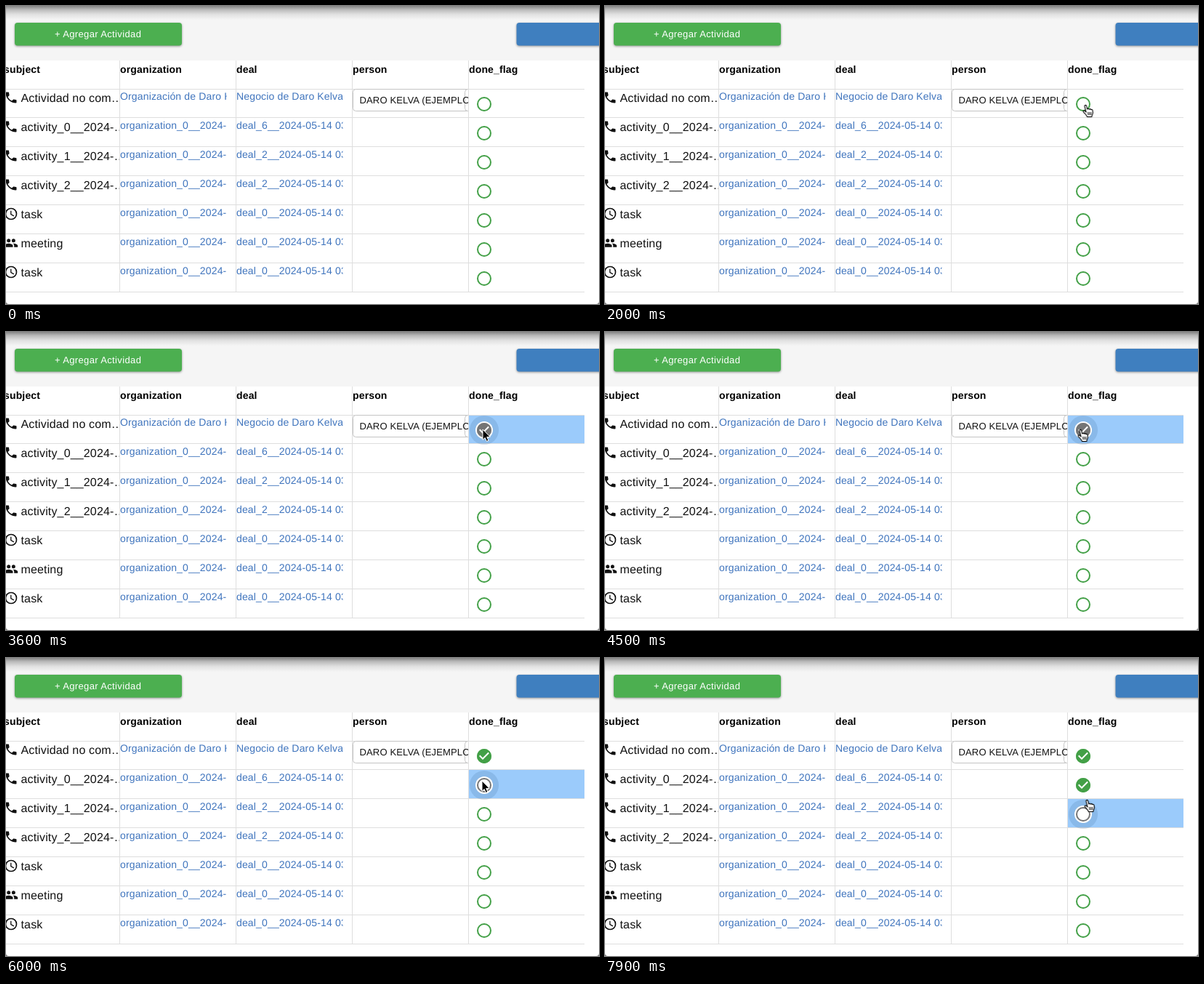
An HTML page for the animation above (8 s loop, 816 by 410 pixels).

```html
<!DOCTYPE html>
<html lang="es">
<head>
<meta charset="utf-8">
<title>Actividades</title>
<style>
  html, body { margin: 0; width: 100%; height: 100%; overflow: hidden; background: #777; }
  #stage { display: block; width: 816px; height: 410px; background: #fff; border-radius: 0 0 4px 4px; }
  text { font: 14px "Liberation Sans", Arial, sans-serif; letter-spacing: .15px; fill: #111; text-rendering: geometricPrecision; white-space: pre; }
  .head { font-weight: bold; fill: #000; }
  .subject { font-size: 16px; }
  .link { fill: #3f74bd; }
  .chip { font-size: 13px; }
  .label { font-size: 13px; letter-spacing: .36px; fill: #fff; }
  .button { filter: drop-shadow(0 1px 1.5px rgba(0, 0, 0, .4)); }
  .line { fill: #dedede; }
  .box { fill: #fff; stroke: #c4c4c4; }

  /* Each row carries two switches: --on (focused) and --done (checked). */
  .row { --on: 0; --done: 0; animation: 8s step-end infinite; }
  .row0 { animation-name: focus0, done0; }
  .row1 { animation-name: focus1, done1; }
  .row2 { animation-name: focus2; }
  .focus { opacity: var(--on); }
  .check { opacity: var(--done); }
  .ripple { opacity: 0; animation: 8s linear infinite; }
  .row0 .ripple { animation-name: ripple0; }
  .row1 .ripple { animation-name: ripple1; }
  @keyframes focus0 { 0% { --on: 0 } 26.25% { --on: 1 } 61.25%, 100% { --on: 0 } }
  @keyframes focus1 { 0% { --on: 0 } 61.25% { --on: 1 } 91.25%, 100% { --on: 0 } }
  @keyframes focus2 { 0% { --on: 0 } 91.25%, 100% { --on: 1 } }
  @keyframes done0 { 0% { --done: 0 } 45%, 100% { --done: 1 } }
  @keyframes done1 { 0% { --done: 0 } 76.25%, 100% { --done: 1 } }
  @keyframes ripple0 { 0%, 31.25% { opacity: 0 } 35% { opacity: 1 } 38.75%, 100% { opacity: 0 } }
  @keyframes ripple1 { 0%, 63.75% { opacity: 0 } 67.5%, 69% { opacity: 1 } 73.75%, 100% { opacity: 0 } }

  #pointer { animation: move 8s step-end infinite; }
  #arrow { animation: arrow 8s step-end infinite; }
  #hand { animation: hand 8s step-end infinite; }
  @keyframes move {
    0% { transform: translate(238px, 262px) }
    1.25% { transform: translate(238px, 262px); animation-timing-function: steps(6) }
    8.75% { transform: translate(570px, 91px); animation-timing-function: steps(2) }
    11.25% { transform: translate(635px, 113px); animation-timing-function: steps(3) }
    15% { transform: translate(670px, 140px); animation-timing-function: steps(4) }
    20% { transform: translate(662px, 137px) }
    25% { transform: translate(661px, 136px); animation-timing-function: steps(3) }
    28.75% { transform: translate(657px, 134px) }
    32.5% { transform: translate(656px, 134px) }
    56.25% { transform: translate(654px, 134px); animation-timing-function: steps(3) }
    60% { transform: translate(655px, 169px) }
    83.75% { transform: translate(655px, 171px) }
    87.5% { transform: translate(654px, 171px) }
    88.75% { transform: translate(654px, 171px); animation-timing-function: steps(3) }
    92.5% { transform: translate(657px, 228px) }
    95% { transform: translate(657px, 228px); animation-timing-function: steps(3) }
    98.75%, 100% { transform: translate(663px, 195px) }
  }
  @keyframes arrow {
    0% { opacity: 0 } 1.25% { opacity: 1 } 13.75% { opacity: 0 } 32.5% { opacity: 1 }
    56.25% { opacity: 0 } 70% { opacity: 1 } 83.75%, 100% { opacity: 0 }
  }
  @keyframes hand {
    0% { opacity: 0 } 13.75% { opacity: 1 } 32.5% { opacity: 0 }
    56.25% { opacity: 1 } 70% { opacity: 0 } 83.75%, 100% { opacity: 1 }
  }
</style>
</head>
<body>
<svg id="stage" viewBox="0 0 816 410">
  <defs>
    <linearGradient id="shade" x2="0" y2="1">
      <stop offset="0" stop-color="#858585"/>
      <stop offset=".25" stop-color="#b8b8b8"/>
      <stop offset=".6" stop-color="#e0e0e0"/>
      <stop offset="1" stop-color="#f5f5f5"/>
    </linearGradient>
    <radialGradient id="glow">
      <stop offset=".45" stop-color="#4a6cc0" stop-opacity=".3"/>
      <stop offset=".75" stop-color="#4a6cc0" stop-opacity=".42"/>
      <stop offset="1" stop-color="#4a6cc0" stop-opacity="0"/>
    </radialGradient>
    <path id="call" d="M6.62 10.79c1.44 2.83 3.76 5.14 6.59 6.59l2.2-2.2c.27-.27.67-.36 1.02-.24 1.12.37 2.33.57 3.57.57.55 0 1 .45 1 1V20c0 .55-.45 1-1 1-9.39 0-17-7.61-17-17 0-.55.45-1 1-1h3.5c.55 0 1 .45 1 1 0 1.25.2 2.45.57 3.57.11.35.03.74-.25 1.02z"/>
    <g id="task" fill="none" stroke="#111">
      <circle cx="12" cy="12" r="9" stroke-width="2"/>
      <path d="M11.75 7v5.6l4.9 2.9" stroke-width="1.6"/>
    </g>
    <g id="meeting">
      <circle cx="8" cy="8" r="3"/>
      <circle cx="16" cy="8" r="3"/>
      <path d="M8 13c-2.33 0-7 1.17-7 3.5V19h14v-2.5C15 14.17 10.33 13 8 13zM16 13l-1 .05c1.2.85 2 2 2 3.45V19h6v-2.5c0-2.33-4.67-3.5-7-3.5z"/>
    </g>
    <circle id="ring" r="9" fill="none" stroke-width="2"/>
    <path id="tick" d="M0-10a10 10 0 1 0 0 20a10 10 0 1 0 0-20zM-2 5l-5-5 1.41-1.41L-2 2.17l7.59-7.59L7-4z" fill-rule="evenodd"/>
  </defs>

  <rect width="816" height="75" fill="#f5f5f5"/>
  <rect width="816" height="19" fill="url(#shade)"/>
  <rect class="button" x="12" y="23" width="230" height="31.5" rx="4" fill="#4caf50"/>
  <rect class="button" x="702.5" y="23" width="200" height="31.5" rx="4" fill="#3f7fbf"/>
  <text class="label" x="67" y="43">+ Agregar Actividad</text>

  <g id="table"></g>

  <g id="pointer">
    <path id="arrow" d="M0 0v14.4l3.2-3 2.2 5 2.5-1.1-2.2-4.9h4.5z" fill="#000" stroke="#fff" stroke-width="1"/>
    <g id="hand" transform="translate(-4.3 -1)" stroke="#000" stroke-linejoin="round" stroke-linecap="round">
      <path fill="#fff" stroke-width="1.1" d="M5.2 11L3.2 3.2C2.8 1.4 5 .6 5.7 2.4L7 7C7.6 5.9 9.2 6 9.5 7.2C10.2 6.2 11.7 6.5 12 7.6C13 6.9 14.1 7.5 14.2 8.6L14.6 11.5C14.7 14 13 15 13 17.5H6.6C6.3 15.5 3.5 13 1.6 10.8C.6 9.4 2.2 8.2 3.6 9.4z"/>
      <path fill="none" stroke-width=".9" d="M7.8 11.3l.3 3.4M9.9 11.3l.1 3.4M12 11.3l-.1 3.4"/>
    </g>
  </g>
</svg>
<script>
  const columns = ['subject', 'organization', 'deal', 'person', 'done_flag'];
  const date = '2024-05-14 03';
  const left = i => 160 * i - 3;

  const item = (icon, subject, deal) =>
    ({ icon, subject, org: `organization_0__${date}`, deal: `deal_${deal}__${date}` });
  const rows = [
    { icon: 'call', subject: 'Actividad no com…', org: 'Organización de Daro Kelva', deal: 'Negocio de Daro Kelva' },
    ...[6, 2, 2].map((deal, i) => item('call', `activity_${i}__2024-…`, deal)),
    item('task', 'task', 0),
    item('meeting', 'meeting', 0),
    item('task', 'task', 0)
  ];

  const rect = (x, y, w, h, attrs) => `<rect x="${x}" y="${y}" width="${w}" height="${h}" ${attrs}/>`;
  const text = (x, y, cls, str) => `<text x="${x}" y="${y}" class="${cls}">${str}</text>`;
  // A nested svg cuts its text off at the cell edge.
  const clipped = (x, y, w, cls, str) =>
    `<svg x="${x}" y="${y - 20}" width="${w}" height="30">${text(0, 20, cls, str)}</svg>`;

  const status = color =>
    `<use href="#ring" stroke="${color}"/><use href="#tick" class="check" fill="${color}"/>`;

  function flag(i) {
    const top = i ? 114 + 40 * i : 115;
    const bottom = 153 + 40 * i;
    const at = `transform="translate(658 ${135 + 40 * i})"`;
    const focus = i > 2 ? '' : `<g class="focus">
      ${rect(637, top, 159, bottom - top, 'fill="#9bcbfb"')}
      <g ${at}>
        <circle r="20" fill="#426ea0" opacity=".2"/>
        <circle r="12" fill="#fff"/>
        <circle class="ripple" r="19" fill="url(#glow)"/>
        ${status('#757575')}
      </g></g>`;
    return `<g class="row row${i}"><g ${at}>${status('#43a047')}</g>${focus}</g>`;
  }

  function row(r, i) {
    const y = 40 * i;
    return `<use href="#${r.icon}" fill="#111" transform="translate(-3 ${116 + y}) scale(.8333)"/>`
      + clipped(20.5, 132 + y, 135.5, 'subject', r.subject)
      + clipped(left(1), 129 + y, 146.5, 'link', r.org)
      + clipped(left(2), 129 + y, 146.5, 'link', r.deal)
      + flag(i);
  }

  const person = `<svg x="477" y="110" width="159" height="40">
    ${rect(.5, 4.5, 170, 30, 'rx="4" class="box"')}
    ${rect(154.5, 4.5, 40, 30, 'rx="4" class="box"')}
    ${text(9.5, 24, 'chip', 'DARO KELVA (EJEMPLO)')}</svg>`;

  const grid = [1, 2, 3, 4].map(i => rect(left(i) - 1, 75, 1, 319, 'class="line"'))
    .concat([114, ...rows.map((_, i) => 153 + 40 * i)].map(y => rect(0, y, 796, 1, 'class="line"')));

  document.getElementById('table').innerHTML =
    grid.join('') + columns.map((name, i) => text(left(i), 92, 'head', name)).join('')
    + person + rows.map(row).join('');
</script>
</body>
</html>
```
